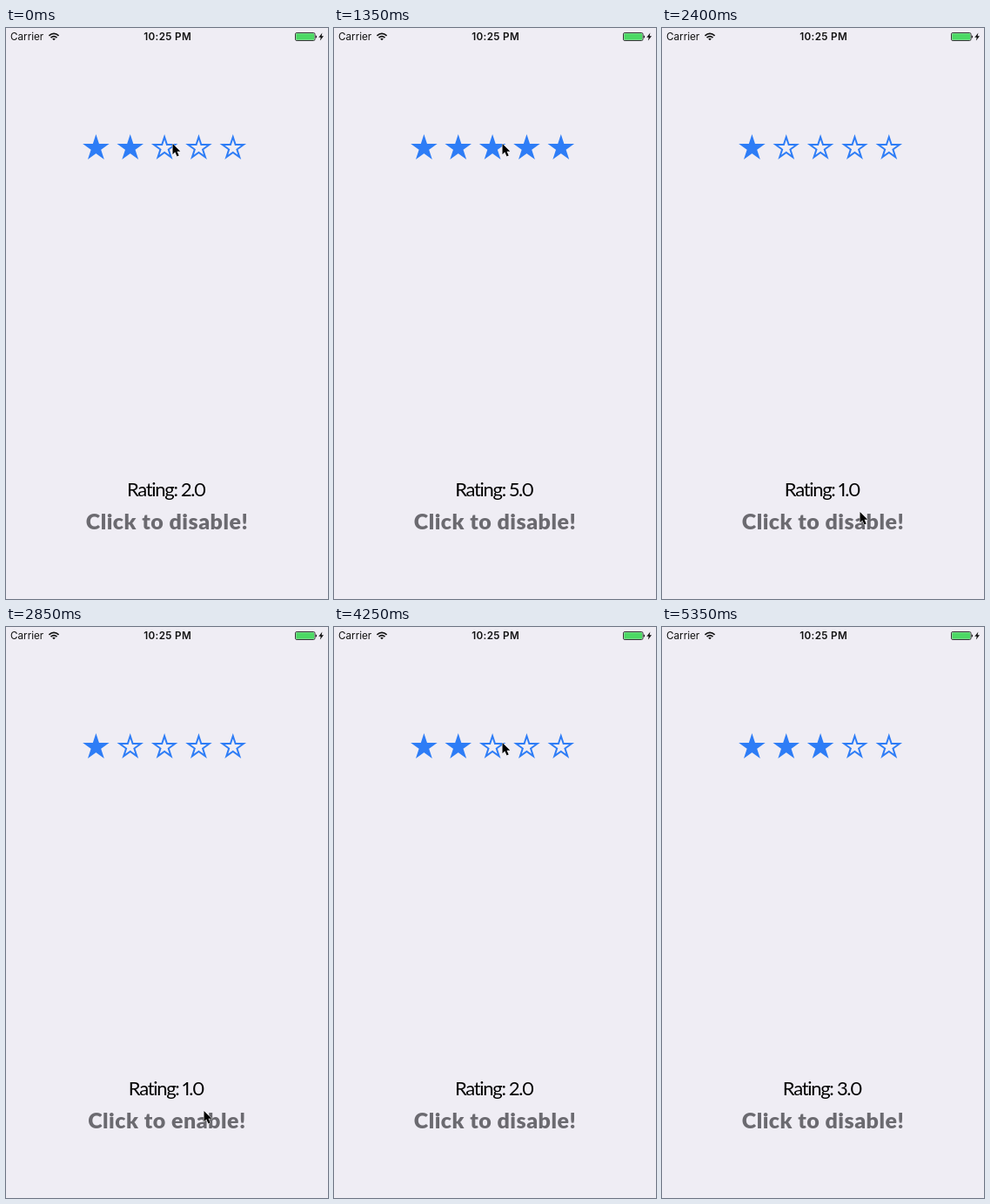
An HTML page that plays this animation: 370 px wide and 656 px high, repeating every 5.4 s.

```html
<!DOCTYPE html>
<html lang="en">
<head>
<meta charset="utf-8">
<title>Star rating</title>
<style>
  html, body { margin: 0; width: 100%; height: 100%; overflow: hidden; background: #efedf4; }
  svg { display: block; width: 100vw; height: 100vh; }
  text { text-anchor: middle; }
  .status { font-family: Inter, sans-serif; font-size: 11.7px; fill: #111; }
  .clock { font-weight: 600; letter-spacing: .35px; }
  .rating { font: 400 22px Lato, sans-serif; letter-spacing: -1.3px; font-variant-numeric: proportional-nums; fill: #000; }
  .button { font: 900 25px Lato, sans-serif; letter-spacing: .5px; fill: #6b6a70; }
</style>
</head>
<body>
<svg viewBox="0 0 370 656" xmlns="http://www.w3.org/2000/svg">
  <rect width="370" height="656" fill="#efedf4"/>

  <g class="status">
    <text x="5" y="14.3" style="text-anchor:start">Carrier</text>
    <text class="clock" x="185.7" y="14.3">10:25 PM</text>
  </g>
  <g fill="none" stroke="#111" stroke-width="1.7">
    <path d="M49.4 8.9Q55 3.9 60.6 8.9M51.5 11.2Q55 8.1 58.5 11.2"/>
    <path d="M55 14.3L53.2 12.4Q55 10.9 56.8 12.4Z" fill="#111" stroke="none"/>
  </g>
  <rect x="332.5" y="5.5" width="22.5" height="9" rx="1.6" fill="none" stroke="#222" stroke-width=".9"/>
  <rect x="333.3" y="6.3" width="20.9" height="7.4" rx=".7" fill="#4cd964"/>
  <path d="M355.6 8.2Q357.2 8.6 357.2 10T355.6 11.8Z" fill="#222"/>
  <path d="M363.4 5.6L359.3 10.8H361.7L360.9 14.4L365 9.2H362.6Z" fill="#111"/>

  <g id="stars" stroke="#2e7df6" stroke-width="2" stroke-miterlimit="4"></g>
  <text id="rating" class="rating" x="184" y="538"></text>
  <text id="button" class="button" x="185" y="575.5"></text>

  <g id="cursor">
    <path d="M0 0V12.3L2.8 9.6L5 14.6L7.2 13.6L5 8.7H8.8Z" stroke="#fff" stroke-width=".9" paint-order="stroke"/>
  </g>
</svg>
<script>
const LOOP = 5400, STEP = 50, BLUE = '#2e7df6';
const FIRST = 103.4, GAP = 39.35, ROW = 138;
const $ = id => document.getElementById(id);

// Pointer rests: it clicks as it leaves each one.
const stop = (arrive, leave, x, y = 133) => ({ arrive, leave, x, y });
const button = (arrive, leave) => stop(arrive, leave, 227, 556);
const stops = [
  stop(0, 150, 191), stop(500, 750, 215), stop(1050, 1150, 275),
  stop(1350, 1450, 193), stop(1650, 1750, 148), stop(2000, 2100, 106),
  button(2350, 2500), stop(2700, 2800, 91), button(2850, 3100),
  stop(3500, 3650, 138), stop(4100, 4400, 193), stop(5350, LOOP, 376, 181)
];

function starPath(cx, cy, r) {
  const points = Array.from({ length: 10 }, (_, i) => {
    const d = i % 2 ? r * 0.382 : r, a = i * Math.PI / 5;
    return (cx + d * Math.sin(a)).toFixed(2) + ' ' + (cy - d * Math.cos(a)).toFixed(2);
  });
  return 'M' + points.join('L') + 'Z';
}

const stars = Array.from({ length: 5 }, (_, i) => {
  const star = document.createElementNS('http://www.w3.org/2000/svg', 'path');
  star.setAttribute('d', starPath(FIRST + i * GAP, ROW, 12.8));
  return $('stars').appendChild(star);
});

// A click on the button toggles the row; a click on a star rates it.
function stateAt(t) {
  let score = 2, enabled = true;
  for (const s of stops.filter(s => s.leave <= t)) {
    if (s.y > 500) enabled = !enabled;
    else if (enabled) score = Math.round((s.x - FIRST) / GAP) + 1;
  }
  return { score, enabled };
}

function pointerAt(t) {
  const i = stops.findIndex(s => s.leave > t);
  const to = stops[i], from = stops[i - 1] || to;
  const u = t >= to.arrive ? 1 : (t - from.leave) / (to.arrive - from.leave);
  const e = u * u * (3 - 2 * u);
  return [from.x + (to.x - from.x) * e, from.y + (to.y - from.y) * e];
}

function draw(t) {
  const { score, enabled } = stateAt(t), [x, y] = pointerAt(t);
  stars.forEach((s, i) => s.setAttribute('fill', i < score ? BLUE : 'none'));
  $('rating').textContent = `Rating: ${score}.0`;
  $('button').textContent = `Click to ${enabled ? 'disable' : 'enable'}!`;
  $('cursor').setAttribute('transform', `translate(${x + 0.5} ${y})`);
}

const start = performance.now();
function tick() {
  const t = (performance.now() - start) % LOOP;
  draw(Math.floor(t / STEP) * STEP);
  requestAnimationFrame(tick);
}
tick();
</script>
</body>
</html>
```
